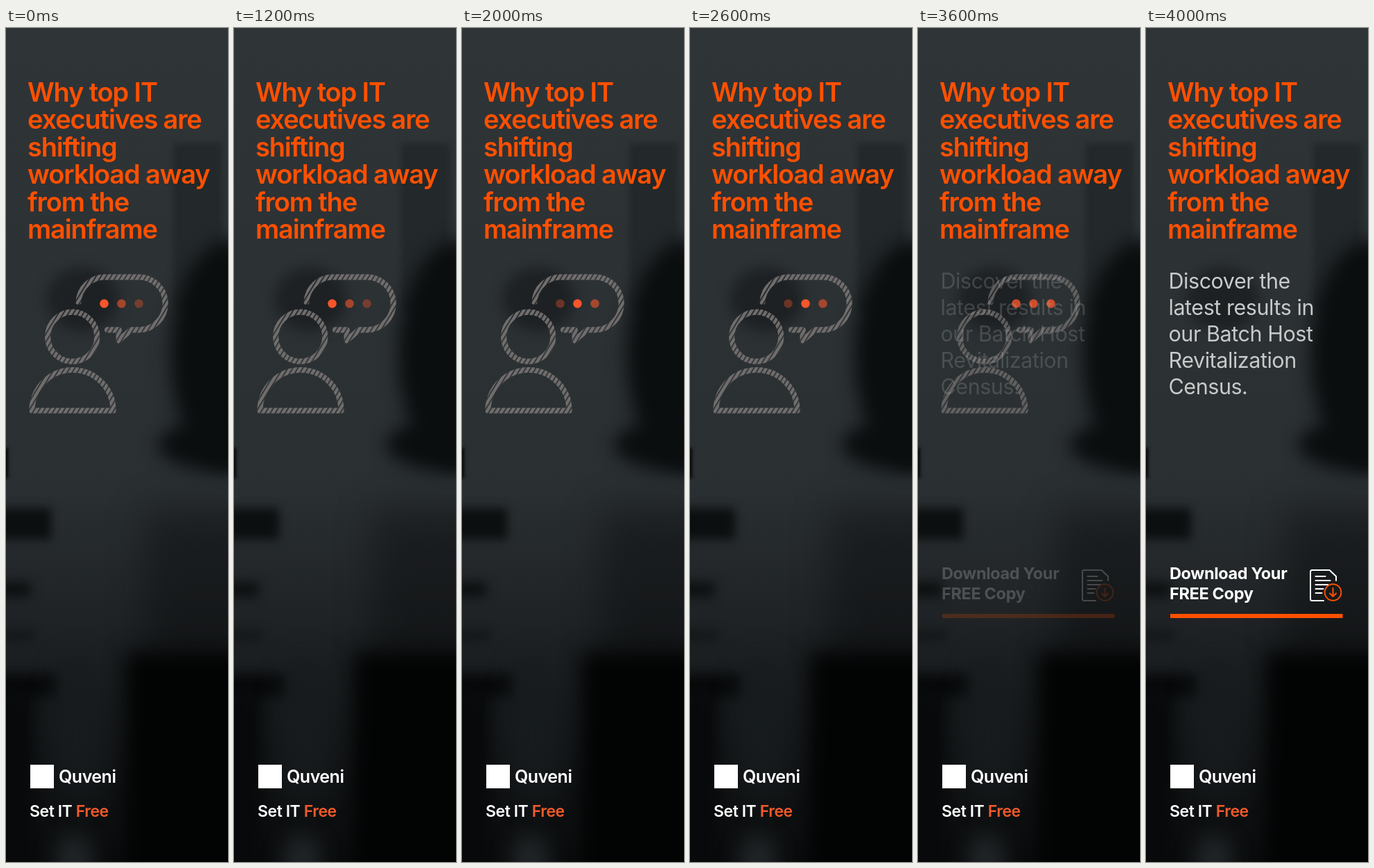
Animation of 320x1200 px, one loop 4.1 s. Source, as an HTML page with a canvas:

```html
<!DOCTYPE html>
<html lang="en">
<head>
<meta charset="utf-8">
<title>Set IT Free</title>
<style>
  html, body { margin: 0; width: 320px; height: 1200px; overflow: hidden; background: #111416; }
  canvas, svg { position: absolute; left: 0; top: 0; display: block; }
  text { font-family: Inter, "Open Sans", sans-serif; white-space: pre; }
  .head { font-size: 38px; font-weight: 600; letter-spacing: -1.15px; fill: #ff5000; }
  .body { font-size: 30.5px; font-weight: 400; letter-spacing: -.45px; fill: #c8caca; }
  .cta { font-size: 23.5px; font-weight: 700; letter-spacing: -.35px; fill: #fff; }
  .slogan { font-size: 23px; font-weight: 600; letter-spacing: -.45px; fill: #fff; }
  .brand { font-size: 25px; font-weight: 600; letter-spacing: -.5px; fill: #fff; }
  .line { fill: none; stroke: #fff; stroke-width: 2; stroke-linecap: round; stroke-linejoin: round; }
  .accent { stroke: #ff5000; }
</style>
</head>
<body>
<canvas id="stage" width="320" height="1200"></canvas>
<svg id="copy" width="320" height="1200" viewBox="0 0 320 1200">
  <g id="offer" opacity="0">
    <rect x="35" y="843" width="248.5" height="6" fill="#ff5000"/>
    <path class="line" d="M256 824H239.5Q237 824 237 821.5V782.5Q237 780 239.5 780H264.5L274 789V795"/>
    <path class="line" d="M244.5 789h14m-14 6h21m-21 6h18m-18 6h11m-11 6h9"/>
    <circle class="line accent" cx="269.5" cy="812" r="11.8"/>
    <path class="line accent" d="M269.5 806v12m-4.5-4.5l4.5 4.5l4.5-4.5"/>
  </g>
  <rect x="35" y="1060" width="34" height="34" fill="#fff"/>
  <text class="brand" x="76" y="1086">Quveni</text>
  <text class="slogan" x="34" y="1135">Set IT <tspan fill="#f15a29">Free</tspan></text>
</svg>
<script>
const W = 320, H = 1200, LOOP = 4100;
const FADE_AT = 3600, FADE_STEP = 100, FADE_STEPS = 5;
const DOT_STEP = 200;
const DOT_FADE = 0.6;

const ctx = document.getElementById('stage').getContext('2d');
const copy = document.getElementById('copy');
const offer = document.getElementById('offer');

function addLines(parent, style, x, y, leading, lines) {
  lines.forEach((line, i) => {
    const el = document.createElementNS('http://www.w3.org/2000/svg', 'text');
    el.setAttribute('class', style);
    el.setAttribute('x', x);
    el.setAttribute('y', y + i * leading);
    el.textContent = line;
    parent.append(el);
  });
}

addLines(copy, 'head', 31, 105.5, 39.5,
  ['Why top IT', 'executives are', 'shifting', 'workload away', 'from the', 'mainframe']);
addLines(offer, 'body', 32.5, 375, 38,
  ['Discover the', 'latest results in', 'our Batch Host', 'Revitalization', 'Census.']);
addLines(offer, 'cta', 34, 793, 29, ['Download Your', 'FREE Copy']);

function layer(paint) {
  const c = document.createElement('canvas');
  c.width = W;
  c.height = H;
  paint(c.getContext('2d'));
  return c;
}

function paintBackdrop(g) {
  const base = g.createLinearGradient(0, 0, 0, H);
  base.addColorStop(0, '#2f3437');
  base.addColorStop(0.55, '#2a2f32');
  base.addColorStop(0.85, '#15181a');
  base.addColorStop(1, '#0a0c0d');
  g.fillStyle = base;
  g.fillRect(0, 0, W, H);

  const soft = (color, blur) => {
    g.fillStyle = color;
    g.filter = `blur(${blur}px)`;
    g.beginPath();
  };
  const box = (color, blur, x, y, w, h) => {
    soft(color, blur);
    g.rect(x, y, w, h);
    g.fill();
  };
  const oval = (color, blur, x, y, rx, ry) => {
    soft(color, blur);
    g.ellipse(x, y, rx, ry, 0, 0, Math.PI * 2);
    g.fill();
  };

  // Wall panel and the large figure on the right
  box('#23282a', 4, 241, 166, 70, 240);
  oval('#0b0e0f', 13, 325, 470, 88, 165);
  oval('#0b0e0f', 12, 305, 600, 86, 36);
  box('rgba(0,0,0,.3)', 26, 200, 690, 180, 230);

  // Head on the left
  oval('#1d2124', 9, 110, 390, 52, 46);

  // Furniture along the left edge
  box('#060809', 2, -10, 604, 13, 44);
  box('#0c0f10', 7, -20, 691, 85, 45);
  box('#0d1011', 8, -20, 797, 55, 22);
  box('#101415', 8, -20, 868, 60, 12);
  box('#07090a', 9, -20, 930, 95, 34);
  box('#07090a', 14, -30, 950, 72, 300);

  // Pale strip beside the black lower right
  oval('#171b1d', 20, 105, 1010, 35, 100);
  oval('#202426', 14, 98, 1195, 28, 36);
  box('#020303', 15, 172, 897, 200, 340);
}

function paintSpeaker(g) {
  g.strokeStyle = '#706d6c';
  g.lineWidth = 8.2;
  g.lineCap = g.lineJoin = 'round';

  g.beginPath();
  g.arc(95.7, 444.3, 35.6, 0, Math.PI * 2);
  g.stroke();

  g.beginPath();
  g.arc(96, 550.5, 58.5, Math.PI, 0);
  g.closePath();
  g.stroke();

  g.beginPath();
  g.arc(142.5, 396.3, 38, Math.PI * 1.02, Math.PI * 1.5);
  g.arc(191.7, 396.3, 38, -Math.PI / 2, Math.PI / 2);
  g.lineTo(180, 434.3);
  g.lineTo(162.7, 449.5);
  g.lineTo(162.7, 434.3);
  g.lineTo(146, 434.3);
  g.stroke();

  // Diagonal gaps
  g.globalCompositeOperation = 'destination-out';
  g.globalAlpha = 0.85;
  g.lineWidth = 2;
  g.beginPath();
  for (let x = -120; x < W; x += 7.2) {
    g.moveTo(x, 565);
    g.lineTo(x + 135, 345);
  }
  g.stroke();
}

const backdrop = layer(paintBackdrop);
const speaker = layer(paintSpeaker);

// Each dot trails the lit one; all stay lit while the scene fades
function drawDots(t, alpha) {
  const lit = Math.floor(t / DOT_STEP) % 3;
  ctx.fillStyle = '#f6562a';
  for (let i = 0; i < 3; i++) {
    const lag = t < FADE_AT ? (i - lit + 3) % 3 : 0;
    ctx.globalAlpha = alpha * DOT_FADE ** lag;
    ctx.beginPath();
    ctx.arc(141.5 + 25 * i, 396.5, 6.3, 0, Math.PI * 2);
    ctx.fill();
  }
}

function draw(t) {
  const step = Math.floor((t - FADE_AT) / FADE_STEP) + 1;
  const shown = Math.min(1, Math.max(0, step / FADE_STEPS));

  ctx.globalAlpha = 1;
  ctx.drawImage(backdrop, 0, 0);
  ctx.globalAlpha = 1 - shown;
  ctx.drawImage(speaker, 0, 0);
  drawDots(t, 1 - shown);
  offer.setAttribute('opacity', shown);
}

const start = performance.now();
function tick() {
  draw((performance.now() - start) % LOOP);
  requestAnimationFrame(tick);
}
tick();
</script>
</body>
</html>
```
